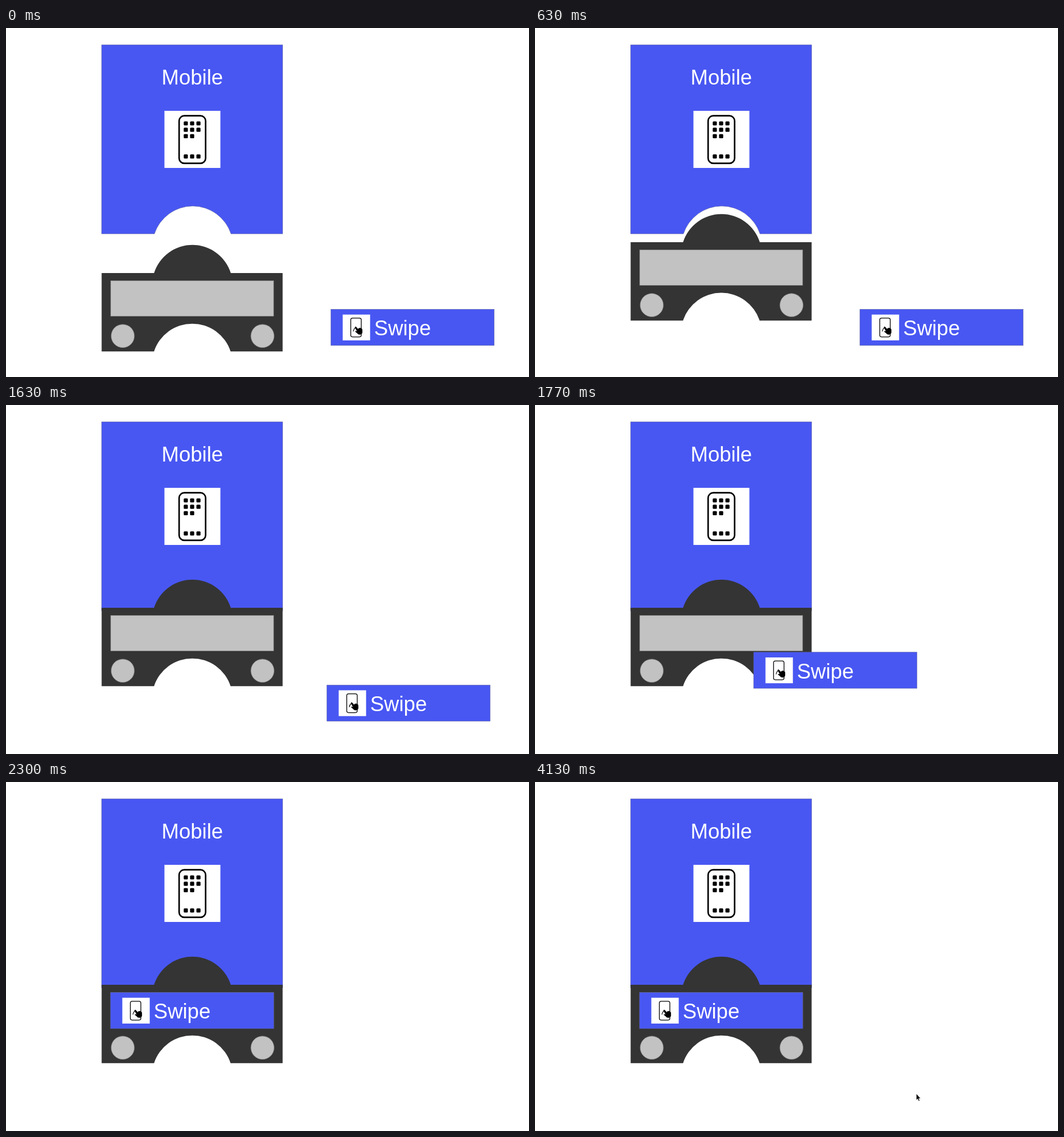
These frames come from a looping animation (916 by 611 pixels, 4160 ms). An HTML page:

```html
<!DOCTYPE html>
<html lang="en">
<head>
<meta charset="utf-8">
<title>Building blocks</title>
<style>
  html, body { margin: 0; width: 100%; height: 100%; overflow: hidden; background: #fff; }
  svg { display: block; }
  text { font: 36.5px "Liberation Sans", Arial, sans-serif; fill: #fff; }
  .blue { fill: #4857f2; }
  .dark { fill: #343434; }
  .slot { fill: #c2c2c2; stroke: #8c8c8c; stroke-width: .7; }
  .edge { stroke: #5a5f9c; stroke-width: .6; }
  .white { fill: #fff; }
  .line { fill: none; stroke: #000; }
</style>
</head>
<body>
<svg width="916" height="611" viewBox="0 0 916 611">
  <!-- Device card -->
  <path class="blue edge" d="M167.5 29.5H484.5V360.3H394A70.5 70.5 0 0 0 260 360.3H167.5Z"/>
  <text x="326.3" y="98.5" text-anchor="middle">Mobile</text>
  <rect class="white" x="277.5" y="145" width="98" height="100"/>
  <rect class="line" x="303.2" y="153.7" width="46.4" height="83.2" rx="9" stroke-width="2.7"/>
  <g id="apps"></g>

  <!-- Dark holder -->
  <g id="holder">
    <path class="dark" d="M167.5 429H259.3A70.5 70.5 0 0 1 393.7 429H484.5V566.2H393.3A70.5 70.5 0 0 0 259.3 566.2H167.5Z"/>
    <rect class="slot" x="183.3" y="442.5" width="285.5" height="62"/>
    <circle class="slot" cx="204.5" cy="539.2" r="20.3"/>
    <circle class="slot" cx="449.2" cy="539.2" r="20.3"/>
  </g>

  <!-- Gesture bar -->
  <g id="bar">
    <rect class="blue edge" x="569" y="492.5" width="286" height="63.3"/>
    <rect class="white" x="589.7" y="501.7" width="48" height="45.2"/>
    <rect class="line" x="603.8" y="507.8" width="18.4" height="33" rx="3.2" stroke-width="1.3"/>
    <path class="line" d="M608.2 531.2Q608.8 527 612.2 524.2" stroke-width="1.2"/>
    <path d="M611.2 523.2Q612.3 522 613.6 523.4L617 527.2Q617 524.6 618.8 525.4Q620 523.9 621 525.4Q622.6 524.6 623.2 526.6Q624.4 527 624.2 529V533.2Q623.5 536.6 619.8 536.8Q616.6 537 614.8 534.2L611.4 531.6Q611.8 530 614.6 530.8L611.2 525Q610.6 524 611.2 523.2Z"/>
    <text x="644.8" y="538.3">Swipe</text>
  </g>

  <path id="pointer" d="M668 546V556.8L670.4 554.6L672 558.5L673.7 557.8L672.1 554H675.2Z" stroke="#fff" stroke-width=".4"/>
</svg>
<script>
  const LOOP = 4160, MOVE = 348;
  const byId = id => document.getElementById(id);
  const [apps, holder, bar, pointer] = ["apps", "holder", "bar", "pointer"].map(byId);

  const appRow = (y, count) => {
    for (let i = 0; i < count; i++)
      apps.innerHTML += `<rect x="${311.3 + 11.1 * i}" y="${y}" width="7.2" height="7.2" rx="1.5"/>`;
  };
  appRow(163.4, 3);
  appRow(174.6, 3);
  appRow(185.7, 2);
  appRow(221.3, 3);

  const ease = (t, start) => {
    const u = Math.min(1, Math.max(0, (t - start) / MOVE));
    return (1 - Math.cos(Math.PI * u)) / 2;
  };
  const shift = (part, dx, dy, amount) =>
    part.setAttribute("transform", `translate(${dx * amount} ${dy * amount})`);

  function draw() {
    const t = performance.now() % LOOP;
    // The holder's slow start is skipped: it jumps into mid-move.
    shift(holder, 0, -74, t < 570 ? 0 : ease(t, 404));
    shift(bar, -386, -124, ease(t, 1601));
    pointer.setAttribute("visibility", t < 4130 ? "hidden" : "visible");
    requestAnimationFrame(draw);
  }
  draw();
</script>
</body>
</html>
```
